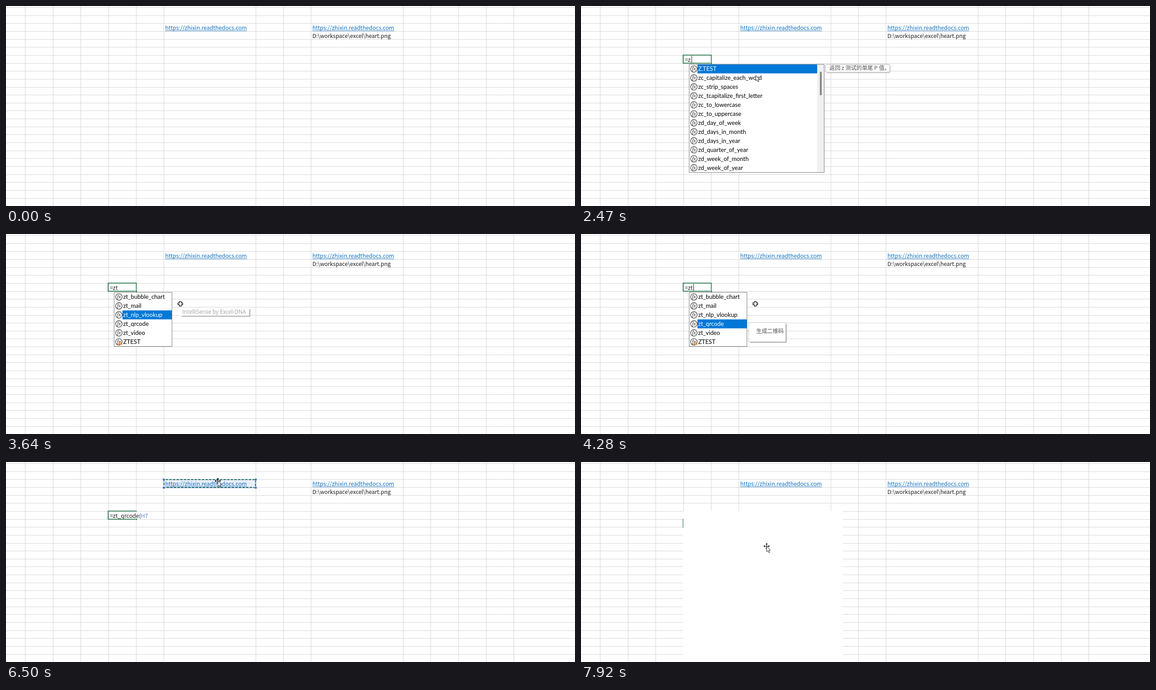
Animation of 1260x444 px, one loop 7.99 s. Source, as an HTML page:

```html
<!DOCTYPE html>
<html lang="zh">
<head>
<meta charset="utf-8">
<title>Spreadsheet function</title>
<style>
  html, body { margin: 0; width: 100%; height: 100%; overflow: hidden; background: #fff; }
  svg { display: block; width: 1260px; height: 444px; }
  text { white-space: pre; }
  .cell { font: 12.37px "Noto Sans CJK SC", "Noto Sans CJK", sans-serif; fill: #1c1c1c; }
  .link { fill: #0f70c0; }
  .ref { fill: #5a7fd0; }
  .list { font: 13.2px Lato, sans-serif; fill: #000; }
  .fx { font: italic 11.5px "Liberation Serif", serif; fill: #222; }
  .tip { font: 12.2px "Noto Sans CJK SC", "Noto Sans CJK", sans-serif; fill: #505050; }
  .sign { font: 11.2px "Open Sans", sans-serif; fill: #505050; }
  .hint { font: 12px "Open Sans", sans-serif; fill: #a0a0a0; }
  .bold { font-weight: 700; }
</style>
</head>
<body>
<svg id="stage" viewBox="0 0 1260 444"></svg>
<script>
const LOOP = 7990;
const GREEN = '#217346', BLUE = '#3f6fc6';
const stage = document.getElementById('stage');

const rect = (x, y, w, h, attrs) => `<rect x="${x}" y="${y}" width="${w}" height="${h}" ${attrs}/>`;
const text = (x, y, cls, str, attrs = '') => `<text x="${x}" y="${y}" class="${cls}" ${attrs}>${str}</text>`;
// Markup that is visible only between two times
const during = (from, to, markup) => `<g data-from="${from}" data-to="${to}">${markup}</g>`;

function grid() {
  const columns = [42, 104, 165, 227, 288, 349, 553, 614, 675, 879, 940, 1002, 1063, 1124];
  let d = columns.map(x => `M${x + .5} 0V444`).join('');
  for (let i = 0; i < 25; i++) d += `M0 ${Math.round(3 + 17.65 * i) + .5}H1260`;
  return `<path d="${d}" stroke="#d5d5d5"/>`;
}

function link(x) {
  return text(x, 53, 'cell link', 'https://zhixin.readthedocs.com') +
    rect(x, 54.5, 181, 1, 'fill="#2a80c8"');
}

function selection(y) {
  return rect(226.2, y, 62.3, 18, `fill="none" stroke="${GREEN}" stroke-width="1.7"`) +
    rect(286.5, y + 16, 4, 4, `fill="${GREEN}" stroke="#fff" stroke-width=".8"`);
}

function icon(y, warning) {
  return `<circle cx="250" cy="${y}" r="7.2" fill="#fff" stroke="#333" stroke-width="1.2"/>` +
    text(246, y + 3.4, 'fx', 'fx') +
    (warning ? `<path d="M253.5 ${y - 2}l4.6 8.6h-9.2z" fill="#f0882d"/><path d="M253.5 ${y + 1}v3m0 1v1" stroke="#fff"/>` : '');
}

function menu(names, width, selected, scrolls) {
  const height = Math.round(names.length * 19.95 + .6);
  const right = scrolls ? 523 : 239 + width;
  let out = rect(239.5, 129.5, width, height, 'fill="#fff" stroke="#777"');
  if (scrolls) out += rect(523, 130, 15, height - 1, 'fill="#f0f0f0"') + rect(529, 146, 4, 52, 'fill="#858585"');
  names.forEach((name, i) => {
    const y = 139.7 + 19.95 * i;
    if (i === selected) out += rect(258, y - 10, right - 258, 19.9, 'fill="#0078d7"');
    out += icon(y, name === 'ZTEST') + text(259.5, y + 4.6, 'list', name, i === selected ? 'style="fill:#fff"' : '');
  });
  return out;
}

function panel(x, y, w, h) {
  return rect(x + 4, y + 4, w - 2, h - 2, 'fill="#858585"') +
    rect(x + .5, y + .5, w, h, 'fill="#fff" stroke="#c4c4c4"');
}

const note = (y, w, str) => panel(371, y, w, 43) + text(388, y + 24, 'tip', str);

function signature() {
  return panel(242, 131, 408, 74) +
    text(246, 143.5, 'sign', 'zt_qrcode(<tspan class="bold">[words]</tspan>, [picture], [colorized])') +
    text(259, 171, 'tip', '生成二维码') +
    text(246, 202, 'tip', '<tspan class="bold" font-family="Open Sans, sans-serif" font-size="11.6">[words]: </tspan>' +
      '【二维码内容，字符串，默认空】需要转成二维码的URL或者内容', 'font-style="italic"');
}

// Cell being edited: text, its right end, and when the caret shows
function edit(from, to, str, end, ...caret) {
  const patch = end > 288 ? rect(287.4, 110, end - 285, 15.5, 'fill="#fff"') : '';
  return during(from, to, patch + text(230, 123.5, 'cell', str)) +
    caret.map(([on, off]) => during(on, off, rect(end, 110.5, 1, 16, 'fill="#111"'))).join('');
}

function rangeBox() {
  const corners = [[349.5, 39], [553, 39], [349.5, 57], [553, 57]];
  return rect(349.5, 39, 203.5, 18, `fill="#4472c4" fill-opacity=".12" stroke="${BLUE}" stroke-width="1.4"`) +
    during(5480, 6590, rect(350, 39, 202.5, 17.5, 'fill="none" stroke="#e8f0f4" stroke-width="1.6"') +
      rect(350, 39, 202.5, 17.5, 'id="ants" fill="none" stroke="#1c6660" stroke-width="1.9" stroke-dasharray="5.5 2.5"')) +
    corners.map(([x, y]) => rect(x - 2.5, y - 2.5, 5, 5, `fill="${BLUE}" stroke="#fff" stroke-width=".6"`)).join('');
}

const arrow = '<path d="M0 0V12.2L2.8 9.6L5 14.2L7 13.3L5 8.9H8.6Z" fill="#fff" stroke="#111" stroke-width=".9"/>';
const pointers = {
  cross: '<path d="M-2-5.3H2V-2H5.3V2H2V5.3H-2V2H-5.3V-2H-2Z" fill="#fff" stroke="#111" stroke-width="1.3"/>',
  arrow,
  move: '<path d="M-5 0H5M0-5V5" stroke="#111" stroke-width="1.1"/>' +
    '<path d="M0-7l2.5 3h-5zM0 7l2.5-3h-5zM-7 0l3-2.5v5zM7 0l-3-2.5v5z" fill="#111"/>' + arrow
};

const zNames = ['Z.TEST', 'zc_capitalize_each_word', 'zc_strip_spaces', 'zc_tcapitalize_first_letter',
  'zc_to_lowercase', 'zc_to_uppercase', 'zd_day_of_week', 'zd_days_in_month', 'zd_days_in_year',
  'zd_quarter_of_year', 'zd_week_of_month', 'zd_week_of_year'];
const ztNames = ['zt_bubble_chart', 'zt_mail', 'zt_nlp_vlookup', 'zt_qrcode', 'zt_video', 'ZTEST'];
const ztMenu = (from, to, selected) => during(from, to, menu(ztNames, 128, selected));
const call = '=zt_qrcode(', ref = '<tspan class="ref">H7</tspan>';

stage.innerHTML = [
  grid(),
  link(352.5), link(678.5),
  text(678.5, 71, 'cell', 'D:\\workspace\\excel\\heart.png'),
  during(900, 7280, selection(109)),
  edit(1830, 2300, '=', 238.5, [1830, 2300]),
  edit(2300, 2770, '=z', 244.7, [2300, 2770]),
  edit(2770, 4470, '=zt', 249, [2770, 3270], [3860, 4390]),
  edit(4470, 5480, call, 299, [4470, 5040]),
  edit(5480, 6590, call + ref, 315.3, [5480, 6010]),
  edit(6590, 7280, call + ref + ')', 319.5, [6590, 7090]),
  during(5480, 7130, rangeBox()),
  during(2380, 2860, menu(zNames, 299, 0, true)),
  during(2470, 2770, rect(543.5, 131.5, 142, 18, 'rx="4" fill="#000" fill-opacity=".14"') +
    rect(541.5, 129.5, 142.5, 17.5, 'rx="3" fill="#fff" stroke="#a8a8a8"') +
    text(550, 142, 'tip', '返回 z 测试的单尾 P 值。')),
  ztMenu(2860, 3510, 0), ztMenu(3510, 3600, 1), ztMenu(3600, 4190, 2), ztMenu(4190, 4470, 3),
  during(2960, 3510, note(136, 586, '生成气泡图，根据所选数据区域的名称和数值绘制气泡，气泡的大小表示数值的高低，颜色表示不同分类')),
  during(3600, 3710, rect(389, 167, 152, 16.5, 'fill="#a8a8a8"') + rect(386, 164, 153, 17.5, 'fill="#fff"') +
    text(390.5, 176.7, 'hint', 'IntelliSense by Excel-DNA')),
  during(3710, 4190, note(176, 499, '自然语言模糊查找，按照文本含义的相似程度匹配查找区域，并返回最接近的对应的内容')),
  during(4260, 4470, note(196, 82, '生成二维码')),
  during(4560, 6430, signature()),
  during(7280, LOOP, selection(127)),
  during(7500, LOOP, rect(226.5, 109, 353.5, 335, 'fill="#fff"')),
  '<g id="pointer"></g>'
].join('');

// Pointer path: time, x, y, shape used from that time on
const path = [
  [250, 1067, 438, 'cross'], [900, 277, 123, 'cross'], [1050, 277, 123, 'cross'],
  [1200, 386, 155, 'cross'], [2380, 386, 155, 'cross'], [2381, 387, 154, 'arrow'],
  [2860, 387, 154, 'arrow'], [2861, 386, 155, 'cross'], [4970, 386, 155, 'cross'],
  [5300, 470, 38, 'cross'], [5400, 470, 43, 'cross'], [5480, 469, 42, 'move'],
  [7280, 469, 42, 'move'], [7281, 470.5, 47, 'cross'], [7750, 470.5, 47, 'cross'],
  [7910, 411, 187, 'move'], [LOOP, 411, 187, 'move']
];
const timed = [...stage.querySelectorAll('[data-from]')];
const pointer = document.getElementById('pointer');
const ants = document.getElementById('ants');
let shape = '';

function draw(t) {
  for (const el of timed) el.style.display = t >= +el.dataset.from && t < +el.dataset.to ? '' : 'none';
  ants.setAttribute('stroke-dashoffset', -1.5 * Math.floor((t - 5480) / 77));

  pointer.style.display = t < path[0][0] ? 'none' : '';
  const i = Math.max(0, path.findIndex(p => p[0] > t) - 1);
  const [t0, x0, y0, kind] = path[i], [t1, x1, y1] = path[i + 1];
  const k = Math.min(1, Math.max(0, (t - t0) / (t1 - t0)));
  const ease = k * k * (3 - 2 * k);
  pointer.setAttribute('transform', `translate(${x0 + (x1 - x0) * ease} ${y0 + (y1 - y0) * ease})`);
  if (kind !== shape) pointer.innerHTML = pointers[shape = kind];
}

function tick() {
  draw(performance.now() % LOOP);
  requestAnimationFrame(tick);
}
tick();
</script>
</body>
</html>
```
